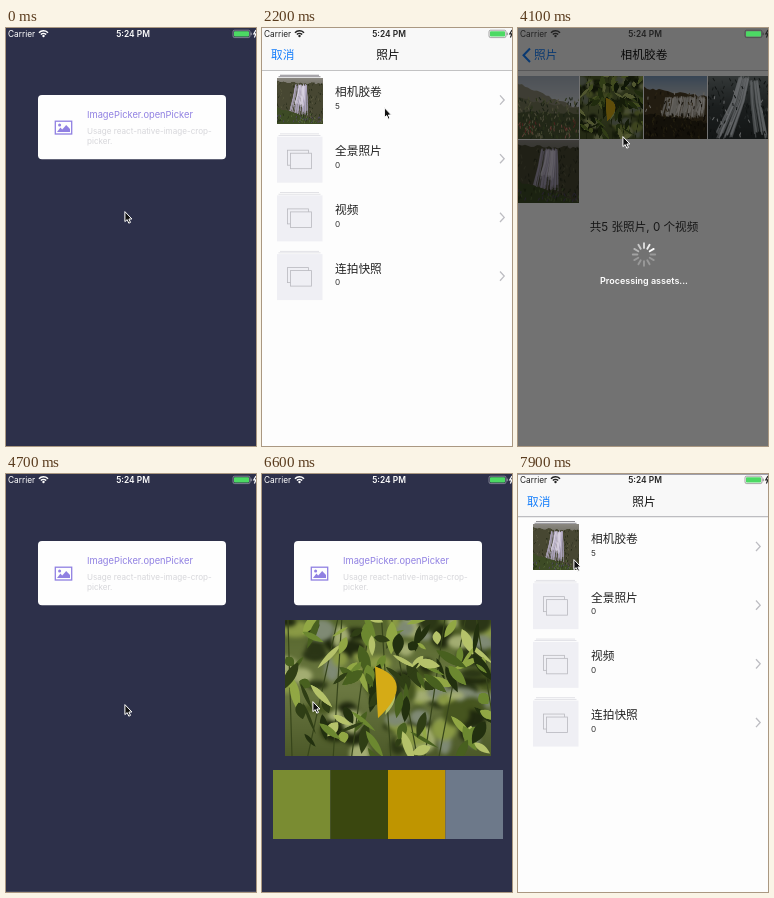
An HTML page with a canvas that plays this animation: 250x418 px, repeating every 8000 ms.

```html
<!DOCTYPE html>
<html lang="zh">
<head>
<meta charset="utf-8">
<title>Image picker</title>
<style>
html, body { margin: 0; width: 100%; height: 100%; overflow: hidden; background: #2d304a; }
canvas { display: block; width: 250px; height: 418px; }
</style>
</head>
<body>
<canvas id="stage"></canvas>
<script>
const W = 250, H = 418, LOOP = 8, MID = 126;
const CELL = 63, PITCH = 64, ROW = 58.7, BAR = 42;
const SANS = 'Inter, "Noto Sans CJK SC", "Noto Sans CJK", sans-serif';
const CJK = '"Noto Sans CJK SC", "Noto Sans CJK", sans-serif';
const BLUE = '#157efb', PURPLE = '#9080e2';

const canvas = document.getElementById('stage');
const dpr = window.devicePixelRatio || 1;
canvas.width = W * dpr;
canvas.height = H * dpr;
const g = canvas.getContext('2d');

// ---------- helpers ----------
const spring = t => t <= 0 ? 0 : t > 0.6 ? 1 : 1 - (1 + 18.3 * t) * Math.exp(-18.3 * t);
const smooth = u => u * u * (3 - 2 * u);
const clamp = u => Math.min(1, Math.max(0, u));

function seeded(seed) {
  return () => (seed = (seed * 16807) % 2147483647) / 2147483647;
}

function rect(c, x, y, w, h, color) {
  c.fillStyle = color;
  c.fillRect(x, y, w, h);
}

function round(x, y, w, h, r, color) {
  g.beginPath();
  g.roundRect(x, y, w, h, r);
  g.fillStyle = color;
  g.fill();
}

function trace(c, points) {
  c.beginPath();
  for (let i = 0; i < points.length; i += 2) c.lineTo(points[i], points[i + 1]);
}

function poly(c, points, color) {
  trace(c, points);
  c.closePath();
  c.fillStyle = color;
  c.fill();
}

function line(c, points, color, width) {
  trace(c, points);
  c.strokeStyle = color;
  c.lineWidth = width;
  c.stroke();
}

function blob(c, x, y, rx, ry, color) {
  c.beginPath();
  c.ellipse(x, y, rx, ry, 0, 0, 7);
  c.fillStyle = color;
  c.fill();
}

function label(str, x, y, size, color, opt = {}) {
  g.font = `${opt.weight || 400} ${size}px ${opt.font || SANS}`;
  g.textAlign = opt.align || 'left';
  g.fillStyle = color;
  g.fillText(str, x, y);
}

// ---------- photos, painted once ----------
function paint(w, h, seed, sky, draw) {
  const pic = document.createElement('canvas');
  pic.width = w * 2;
  pic.height = h * 2;
  const c = pic.getContext('2d');
  c.scale(2, 2);
  const fill = c.createLinearGradient(0, 0, 0, h);
  sky.forEach((color, i) => fill.addColorStop(i / (sky.length - 1), color));
  rect(c, 0, 0, w, h, fill);
  draw(c, seeded(seed), w, h);
  return pic;
}

// Ground with a rough edge from the left height to the right height.
function ridge(c, r, left, right, color) {
  const pts = [0, CELL];
  for (let x = 0; x <= CELL; x += 3) pts.push(x, left + (right - left) * x / CELL + (r() - 0.5) * 3);
  poly(c, [...pts, CELL, CELL], color);
}

// Falling water: thin strands that spread out on the way down.
function fall(c, r, x0, y0, x1, y1, wide, color) {
  c.globalAlpha = 0.55;
  for (let i = 0; i < wide * 2; i++) {
    const d = (r() - 0.5) * wide;
    const mid = y0 + (y1 - y0) * 0.4;
    line(c, [x0 + d * 0.8, y0 + r() * 3, x0 + (x1 - x0) * 0.3 + d, mid, x1 + d * 1.3, y1 - r() * 8], color, 1.2);
  }
  c.globalAlpha = 1;
}

function speckle(c, r, n, top, bottom, colors) {
  for (let i = 0; i < n; i++) {
    const x = r() * CELL, y = top + r() * (bottom - top);
    line(c, [x, y, x + r() * 4 - 2, y - 3], colors[i % colors.length], 1);
  }
}

function leaf(c, x, y, len, wide, angle, color) {
  c.save();
  c.translate(x, y);
  c.rotate(angle);
  c.beginPath();
  c.moveTo(0, 0);
  c.quadraticCurveTo(len * 0.4, -wide, len, 0);
  c.quadraticCurveTo(len * 0.4, wide, 0, 0);
  c.fillStyle = color;
  c.fill();
  c.restore();
}

const foliage = paint(206, 137, 71, ['#55652c', '#6c7942', '#4c5929'], (c, r, w, h) => {
  const haze = ['#a3ad72', '#2b3616', '#7f8a74', '#46551f', '#8a9a45', '#20290f'];
  const greens = ['#91a744', '#2f3e15', '#6c8830', '#22300f', '#b5c26a', '#48601f'];
  c.filter = 'blur(4px)';
  for (let i = 0; i < 90; i++) blob(c, r() * w, r() * h, 5 + r() * 12, 4 + r() * 9, haze[i % 6]);
  c.filter = 'blur(0.5px)';
  for (let i = 0; i < 9; i++) {
    const x = r() * w;
    line(c, [x, 0, x + r() * 60 - 30, h], '#37451b', 1.2);
  }
  for (let i = 0; i < 110; i++) {
    leaf(c, r() * w, r() * h - 8, 10 + r() * 26, 3 + r() * 9, 0.2 + r() * 2.6, greens[i % 6]);
  }
  c.beginPath();
  c.moveTo(90, 47);
  c.quadraticCurveTo(132, 62, 93, 99);
  c.fillStyle = '#d5ab16';
  c.fill();
  c.filter = 'none';
});

const meadow = paint(CELL, CELL, 12, ['#aab5c2', '#d5d7d9', '#d5d7d9'], (c, r) => {
  ridge(c, r, 7, 33, '#8b8873');
  ridge(c, r, 22, 32, '#77795a');
  ridge(c, r, 36, 37, '#4b5734');
  speckle(c, r, 170, 24, 63, ['#8f9662', '#37452a', '#a8a47d', '#566b35']);
  speckle(c, r, 30, 46, 63, ['#a3493f', '#c98672']);
});

const cascade = paint(CELL, CELL, 5, ['#7d9bbd', '#e3d8c8', '#8d7a5c'], (c, r) => {
  ridge(c, r, 12, 21, '#4c3f26');
  for (let x = 24; x < CELL; x += 5) fall(c, r, x, 20, x - 3, 43, 7, x % 2 ? '#eeeae2' : '#cbc6bd');
  ridge(c, r, 38, 46, '#2b2314');
  speckle(c, r, 110, 40, 63, ['#17130a', '#4b4120', '#332b17']);
  speckle(c, r, 40, 18, 40, ['#5e4d2c', '#2d2516', '#ddd7cb']);
});

const rocks = paint(CELL, CELL, 31, ['#727b7b', '#3c4343', '#2a3030'], (c, r) => {
  speckle(c, r, 120, 4, 63, ['#1f2524', '#545d5c', '#303735']);
  fall(c, r, 36, 0, 16, 63, 13, '#e4e9ee');
  fall(c, r, 46, 4, 53, 63, 10, '#d3dade');
  speckle(c, r, 30, 10, 63, ['#252b2a', '#e4e8ea']);
});

const canyon = paint(CELL, CELL, 18, ['#8a8780', '#4a4937', '#2d3020'], (c, r) => {
  ridge(c, r, 5, 8, '#474732');
  speckle(c, r, 150, 8, 63, ['#2b2f1c', '#5a5a40', '#393b29']);
  fall(c, r, 33, 8, 29, 52, 20, '#b3a9c4');
  fall(c, r, 35, 9, 31, 42, 10, '#d8d1e2');
  ridge(c, r, 40, 62, '#3d4b25');
  speckle(c, r, 60, 50, 63, ['#2a351a', '#56683a', '#4d465c']);
});

// ---------- screens ----------
function home(t) {
  rect(g, 0, 0, W, H, '#2d304a');
  round(32, 67, 188, 64.3, 4, '#fefefe');

  g.strokeStyle = PURPLE;
  g.lineWidth = 1.3;
  g.strokeRect(49.3, 93.2, 16.4, 12.8);
  blob(g, 53.6, 97, 1.5, 1.5, PURPLE);
  poly(g, [51, 104, 54.5, 99.6, 58, 104], PURPLE);
  poly(g, [54, 104, 60.2, 97, 64, 101, 64, 104], PURPLE);

  label('ImagePicker.openPicker', 81, 90, 9.3, PURPLE);
  label('Usage react-native-image-crop-', 81, 105.5, 8.1, '#d6d6da');
  label('picker.', 81, 115.5, 8.1, '#d6d6da');

  if (t >= 5.8) {
    g.drawImage(foliage, 23, 145.5, 206, 136.5);
    ['#7a8c32', '#3a470f', '#bf9500', '#6d798a'].forEach((color, i) =>
      rect(g, 11 + i * 57.5, 296, 57.5, 69, color));
  }
}

function albums(picked) {
  rect(g, -10, BAR, 280, H, '#fdfdfd');
  if (picked) rect(g, 0, BAR, 280, ROW, '#d9d9d9');
  ['相机胶卷', '全景照片', '视频', '连拍快照'].forEach((name, i) => {
    const y = 50 + i * ROW;
    const edge = i ? '#dcdce2' : '#6f6d74';
    rect(g, 18, y - 3.2, 39, 0.8, edge);
    rect(g, 16.5, y - 1.6, 42, 0.8, edge);
    if (i === 0) {
      g.drawImage(canyon, 15, y, 45.5, 46);
    } else {
      rect(g, 15, y, 45.5, 46, '#efeff4');
      g.strokeStyle = '#b9b9bf';
      g.lineWidth = 0.8;
      g.strokeRect(25.5, y + 13.5, 21, 15);
      rect(g, 28.5, y + 16.5, 21, 15.5, '#efeff4');
      g.strokeRect(28.5, y + 16.5, 21, 15.5);
    }
    label(name, 73, y + 18.4, 11.7, '#222', { font: CJK });
    label(i ? '0' : '5', 73, y + 31.2, 8.2, '#333');
    line(g, [238, y + 17.4, 242.2, y + 22, 238, y + 26.6], '#bdbdc2', 1.3);
  });
}

function photos() {
  rect(g, -2, BAR, 260, H, '#fdfdfd');
  [meadow, foliage, cascade, rocks, canyon].forEach((pic, i) => {
    const side = pic.height;
    const x = -2 + (i % 4) * PITCH, y = 48 + Math.floor(i / 4) * PITCH;
    g.drawImage(pic, (pic.width - side) / 2, 0, side, side, x, y, CELL, CELL);
  });
  label('共5 张照片, 0 个视频', MID, 203, 11.6, '#333', { align: 'center' });
}

function navBar(push) {
  const title = { font: CJK, weight: 500, align: 'center' };
  const away = 1 - push;
  rect(g, 0, 0, W, BAR, '#f8f8f8');
  rect(g, 0, BAR, W, 0.8, '#b4b4b6');
  g.globalAlpha = away;
  label('取消', 9, 31.2, 11.7, BLUE, { font: CJK });
  label('照片', MID - push * 98, 31.2, 11.7, '#111', title);
  g.globalAlpha = push;
  line(g, [12, 20.5, 5.5, 27.2, 12, 34], BLUE, 2);
  label('照片', 27.7 + away * 70, 31.2, 11.7, BLUE, { font: CJK, align: 'center' });
  label('相机胶卷', MID + away * 70, 31.2, 11.7, '#111', title);
  g.globalAlpha = 1;
}

function picker(open, push) {
  g.save();
  g.translate(0, (1 - open) * H);
  g.save();
  g.translate(-79 * push, 0);
  albums(push > 0);
  g.restore();
  rect(g, 0, BAR, W, H, `rgba(0,0,0,${0.13 * push})`);
  if (push > 0) {
    g.save();
    g.translate((1 - push) * 256, 0);
    photos();
    g.restore();
  }
  navBar(push);
  g.restore();
}

function busy(t) {
  rect(g, 0, 0, W, H, 'rgba(0,0,0,.55)');
  const lead = 2 + Math.floor((t - 4.1) * 12 + 0.01);
  g.lineCap = 'round';
  for (let i = 0; i < 12; i++) {
    const age = (lead - i + 24) % 12;
    g.save();
    g.translate(MID, 226.5);
    g.rotate(i * Math.PI / 6);
    line(g, [0, -6.6, 0, -11.2], `rgba(255,255,255,${Math.max(0.28, 1 - age * 0.13)})`, 1.9);
    g.restore();
  }
  g.lineCap = 'butt';
  label('Processing assets...', MID, 256, 9, '#fff', { weight: 600, align: 'center' });
}

function statusBar(color) {
  label('Carrier', 2, 9, 8.3, color);
  label('5:24 PM', 127, 9, 8.4, color, { weight: 600, align: 'center' });
  g.strokeStyle = color;
  g.lineWidth = 1.5;
  for (const r of [3.6, 6.2]) {
    g.beginPath();
    g.arc(37.5, 9, r, -Math.PI * 0.76, -Math.PI * 0.24);
    g.stroke();
  }
  blob(g, 37.5, 8, 1.2, 1.2, color);

  g.globalAlpha = 0.55;
  g.lineWidth = 0.7;
  g.beginPath();
  g.roundRect(227, 2.2, 17, 7.4, 1.6);
  g.stroke();
  rect(g, 244.7, 4.6, 1, 2.6, color);
  g.globalAlpha = 1;
  round(228, 3.2, 15, 5.4, 0.8, '#4cd964');
  line(g, [250, 2, 247.8, 5.8, 250, 5.8, 248.4, 9.4], color, 1.2);
}

// ---------- pointer: arrival time, x, y ----------
const HOP = 0.4;
const stops = [
  [0, 118.5, 183], [0.75, 125, 110], [2.2, 122, 79], [3.6, 104.5, 108],
  [4.5, 118.5, 230], [6.5, 50.5, 227], [7.25, 55.5, 85]
];

function pointer(t) {
  let x = stops[0][1], y = stops[0][2];
  for (const [at, nx, ny] of stops) {
    const u = smooth(clamp((t - at) / HOP + 1));
    x += (nx - x) * u;
    y += (ny - y) * u;
  }
  g.save();
  g.translate(x, y);
  g.lineJoin = 'round';
  poly(g, [0.4, 0.6, 0.4, 10.6, 2.7, 8.6, 4.3, 12.2, 6, 11.4, 4.4, 8, 7.4, 8], '#111');
  g.strokeStyle = '#fff';
  g.lineWidth = 1;
  g.stroke();
  g.restore();
}

function frame(now) {
  const t = (now / 1000) % LOOP;
  const again = t >= 4.8;
  const open = again ? spring(t - 7.4) : spring(t - 0.965) - spring(t - 4.12);
  const push = again ? 0 : spring(t - 2.51);
  const dark = (t > 0.965 && t < 4.2) || t > 7.4;

  g.setTransform(dpr, 0, 0, dpr, 0, 0);
  home(t);
  if (open > 0) picker(open, push);
  if (t >= 3.85 && t < 4.12) busy(t);
  statusBar(dark ? '#222' : '#fff');
  pointer(t);
  requestAnimationFrame(frame);
}
requestAnimationFrame(frame);
</script>
</body>
</html>
```
